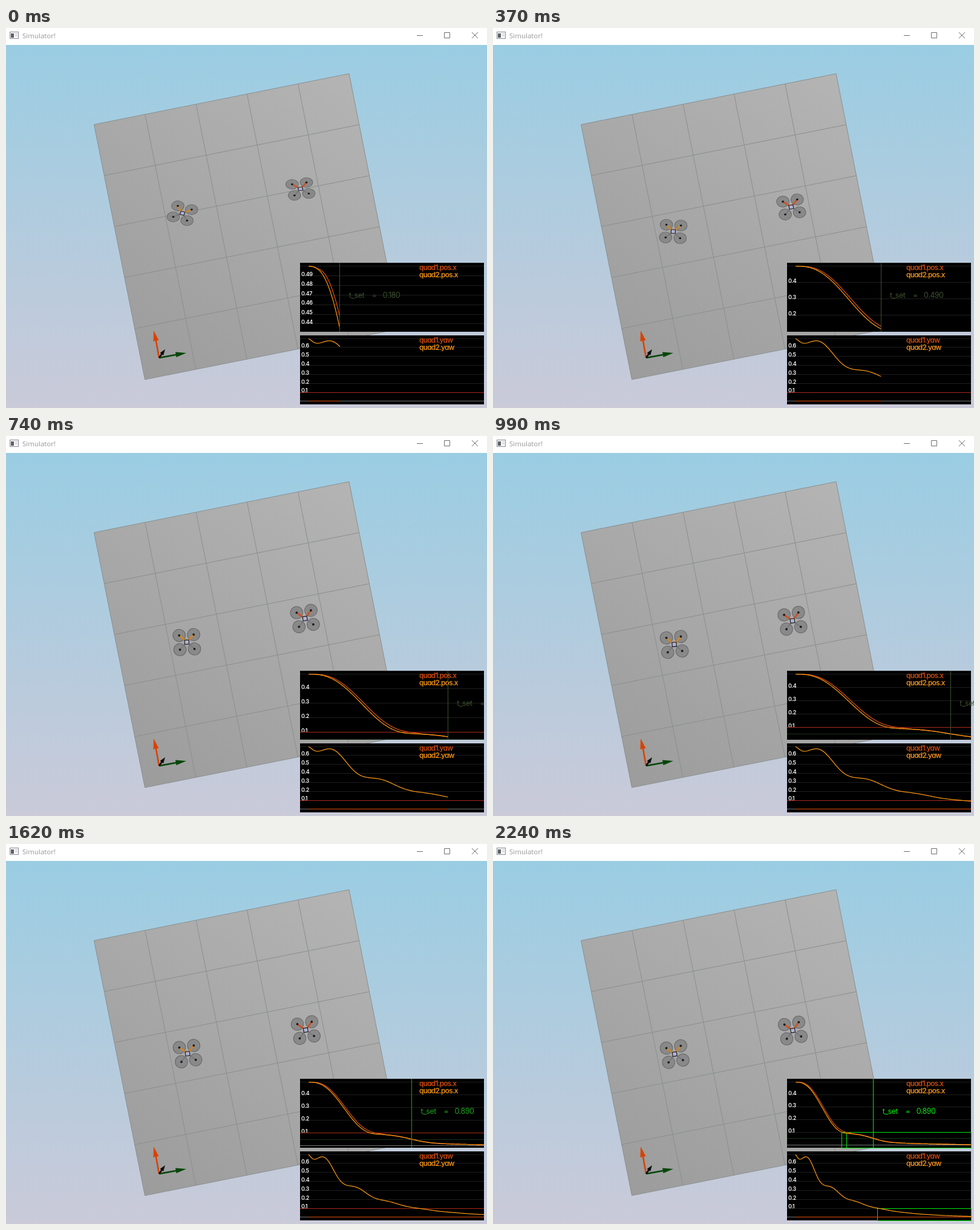
Write an HTML page that moves like this. It is 795x628 px and loops after 2.36 s.

```html
<!DOCTYPE html>
<html lang="en">
<head>
<meta charset="utf-8">
<title>Simulator</title>
<style>
html, body { margin: 0; width: 100%; height: 100%; overflow: hidden; background: #fff; }
svg { display: block; width: 795px; height: 628px; }
.title { font: 11.5px "Open Sans", "Noto Sans", sans-serif; fill: #999; }
.plot text { font-family: Inter, Roboto, sans-serif; font-feature-settings: "cv11"; }
.axis { font-size: 9px; font-weight: 600; letter-spacing: -.45px; }
.legend { font-size: 12px; font-weight: 500; letter-spacing: -.75px; }
.settle { font-size: 12.5px; letter-spacing: -.5px; }
.plot path, .plot line, .plot rect { fill: none; }
.plot line, .plot rect { shape-rendering: crispEdges; }
</style>
</head>
<body>
<svg viewBox="0 0 795 628">
  <defs>
    <linearGradient id="sky" x2="0" y2="1">
      <stop stop-color="#9acde3"/><stop offset="1" stop-color="#cacad9"/>
    </linearGradient>
    <linearGradient id="floor" gradientUnits="userSpaceOnUse" x1="567" y1="75" x2="229" y2="581">
      <stop stop-color="#b3b4b3"/><stop offset=".55" stop-color="#a6a7a6"/><stop offset="1" stop-color="#9c9c9c"/>
    </linearGradient>
    <clipPath id="top"><rect x="486" y="388" width="305" height="115"/></clipPath>
    <clipPath id="bottom"><rect x="486" y="508" width="305" height="115"/></clipPath>
  </defs>
  <rect width="795" height="628" fill="#fff"/>
  <rect y="28" width="795" height="600" fill="url(#sky)"/>
  <g fill="none" stroke="#707070">
    <rect x="6.5" y="6.5" width="14" height="11" fill="#f4f4f4" stroke="#8a8f96"/>
    <path d="M8 9h5v7h-5z" fill="#5d6066" stroke="none"/>
    <path d="M15 9.5h4M15 12.5h4" stroke="#c4c8cc"/>
    <path d="M679 12.5h10M724.5 7.5h9v9h-9zM770 7l10 10M780 7l-10 10"/>
  </g>
  <text class="title" x="27" y="17">Simulator!</text>
  <path d="M145.500 159.500L567 75.500L651 497L229.500 581z" fill="url(#floor)"/>
  <path id="grid" fill="none" stroke="#8b8f8f"/>
  <g id="drones"></g>
  <g stroke-width="2.600">
    <path d="M253 545L248 517" stroke="#d94304"/>
    <path d="M244 500L243.500 518L252.500 516z" fill="#d94304"/>
    <path d="M253 545L281 540" stroke="#06470a"/>
    <path d="M298 537L280 535.500L281.500 544z" fill="#06470a"/>
    <path d="M253 545L258 538" stroke="#080c14"/>
    <path d="M263 531L254.500 537L260 541z" fill="#080c14"/>
  </g>
  <path d="M486 388h304v114h-304zM486 508h304v114h-304z" fill="#000"/>
  <g id="plots" class="plot"></g>
</svg>
<script>
const LOOP = 2360, STEPS = 19, LEAD = 8;
const RED = "#e0500c", ORANGE = "#ff9a16", GREEN = "#00e60a", LIMIT = "#a82a18", ZERO = "#747474";
const LEFT = 500, RIGHT = 790, RATE = 288;
// Simulated seconds at which each signal settles, and how long it must hold.
const SETTLED = 0.89;
const WINDOW = { pos2: [0.532, 1.25], pos1: [0.586, 1.25], yaw2: [0.94, 1] };
const byId = id => document.getElementById(id);
const clamp = v => Math.min(1, Math.max(0, v));
const smoother = u => u * u * u * (10 + u * (6 * u - 15));

// A fast glide, then a slower second drop on a slight slope.
const pos2 = t => 0.398 * (1 - smoother(clamp(t / 0.61)))
  + 0.072 / (1 + Math.exp((t - 0.88) / 0.09)) + 0.03 * (1 - t / 2);
const pos1 = t => pos2(t) + 0.02 * Math.sin(Math.PI * clamp((t - 0.05) / 0.62));
// Exponential decay with a dying ripple.
const yaw2 = t => 0.7 * Math.exp(-2.07 * t)
  + 0.3 * Math.exp(-4.65 * t) * Math.sin(Math.PI * Math.max(0, t - 0.027) / 0.28) ** 2;

const quad2 = { home: [300.2, 347.2], pos: pos2, yaw: yaw2, arm: "#d8861a" };
const quad1 = { home: [495.5, 308.2], pos: pos1, yaw: () => 0, arm: "#d84a1a" };

function drone({ home, pos, yaw, arm }, t) {
  const x = pos(t), h = 0.02;
  const accel = (pos(t + h) - 2 * x + pos(t - h)) / (h * h);
  const squash = Math.cos(0.1 - 0.1 * accel);
  const turn = yaw(t) * 0.8 * 180 / Math.PI - 9.5;
  const tips = [[12, -12], [-12, -12], [12, 12], [-12, 12]];
  const rotors = tips.map(([u, v]) => `<circle cx="${u}" cy="${v}" r="10.3" fill="#898989" stroke="#666"/>`);
  const arms = tips.map(([u, v]) =>
    `<path d="M0 0L${u} ${v}" stroke="${v < 0 ? arm : "#74747f"}" stroke-width="${v < 0 ? 2.5 : 1.5}"/>`);
  const hubs = tips.map(([u, v]) => `<circle cx="${u}" cy="${v}" r="1.9" fill="#1c1c1c"/>`);
  return `<g transform="translate(${home[0] - 19.7 * x} ${home[1] - 94.5 * x}) scale(1 ${squash}) rotate(${turn})">
    ${[...rotors, ...arms, ...hubs].join("")}
    <rect x="-3.500" y="-3.500" width="7" height="7" fill="#b2b2d0" stroke="#202028" stroke-width="1.200"/></g>`;
}

const line = (x1, y1, x2, y2, color) =>
  `<line x1="${x1}" y1="${y1}" x2="${x2}" y2="${y2}" stroke="${color}"/>`;
const level = (y, color) => line(486, Math.floor(y) + 0.5, RIGHT, Math.floor(y) + 0.5, color);
const text = (x, y, s, color, cls) => `<text class="${cls}" x="${x}" y="${y}" fill="${color}">${s}</text>`;
const box = (x, top, bottom) => {
  const y = Math.floor(top) + 0.5;
  return `<rect x="${Math.floor(x) + 0.5}" y="${y}" width="${RIGHT - Math.floor(x)}" height="${bottom - y}" stroke="${GREEN}"/>`;
};
const passed = ([start, hold], t) => t > start + hold;

function trace(height, t, scale, color) {
  const points = [], end = t * scale;
  for (let d = 0; d < end; d++) points.push(`${LEFT + d} ${height(d / scale).toFixed(2)}`);
  points.push(`${LEFT + end} ${height(t).toFixed(2)}`);
  return `<path d="M${points.join("L")}" stroke="${color}" stroke-width="1.200"/>`;
}

function scaleMarks(y, min, max, step) {
  let out = "";
  for (let k = Math.ceil(min / step) || 1; k * step <= max + 1e-6; k++) {
    const v = k * step;
    out += level(y(v), "#1e1e1e");
    if (v < max - 1e-6) out += text(488, y(v) + 0.3, v.toFixed(step < 0.1 ? 2 : 1), "#f6f6f6", "axis");
  }
  return out;
}

const legend = (name, y) =>
  text(683, y, `quad1.${name}`, RED, "legend") + text(683, y + 11.7, `quad2.${name}`, ORANGE, "legend");

function settleMark(t, scale) {
  const shown = Math.min(t, SETTLED), x = LEFT + shown * scale;
  const glow = clamp((t - 1) / 0.7) ** 2;
  const mix = (dim, bright) => Math.round(dim + (bright - dim) * glow);
  const tint = `rgb(${mix(60, 0)},${mix(80, 235)},${mix(48, 10)})`;
  return line(x, 388, x, 502, tint) + text(x + 15, 445.5, "t_set", tint, "settle")
    + text(x + 53, 445.5, "=", tint, "settle") + text(x + 71, 445.5, shown.toFixed(2) + "0", tint, "settle");
}

function posPlot(t, scale) {
  const min = Math.max(0, pos2(t)), span = 0.5 - min;
  const y = v => 393.5 + (0.5 - v) / span * 103.5;
  const limit = y(0.1), edge = ([start]) => LEFT + start * scale;
  let out = scaleMarks(y, min, 0.5, span < 0.1 ? 0.01 : 0.1);
  if (y(0) < 502) out += level(y(0), ZERO);
  if (y(0.05) < 502) out += level(y(0.05), "#17331a");
  if (limit < 500 && !passed(WINDOW.pos1, t)) out += level(limit, LIMIT);
  for (const w of [WINDOW.pos2, WINDOW.pos1]) if (passed(w, t)) out += box(edge(w), limit, 502.5);
  out += legend("pos.x", 400) + trace(s => y(pos1(s)), t, scale, RED) + trace(s => y(pos2(s)), t, scale, ORANGE);
  return `<g clip-path="url(#top)">${out}</g>${settleMark(t, scale)}`;
}

function yawPlot(t, scale) {
  const y = v => 617 - v * 148.4;
  const out = scaleMarks(y, 0, 0.7, 0.1) + level(616.5, ZERO)
    + (passed(WINDOW.yaw2, t) ? box(LEFT + WINDOW.yaw2[0] * scale, 602, 622.5) : level(602, LIMIT))
    + legend("yaw", 520) + line(LEFT, 616.5, LEFT + t * scale, 616.5, RED)
    + trace(s => y(yaw2(s)), t, scale, ORANGE);
  return `<g clip-path="url(#bottom)">${out}</g>`;
}

function drawGrid() {
  let d = "";
  for (let i = 0; i <= 5; i++) {
    const u = i * 84.3, v = i * 16.8;
    d += `M${145.5 + u} ${159.5 - v}l84 421.500M${145.5 + v} ${159.5 + u}l421.500 -84`;
  }
  byId("grid").setAttribute("d", d);
}

function render(step) {
  const t = 0.18 + 0.1033 * step - 0.0048 * Math.max(0, step - 11);
  const scale = Math.min(RATE, (RIGHT - LEFT) / t);
  byId("drones").innerHTML = drone(quad2, t) + drone(quad1, t);
  byId("plots").innerHTML = posPlot(t, scale) + yawPlot(t, scale);
}

let shown = -1;
const begin = performance.now();
function tick() {
  const now = (performance.now() - begin) % LOOP;
  const step = Math.min(STEPS - 1, Math.floor((now + LEAD) * STEPS / LOOP));
  if (step !== shown) render(shown = step);
  requestAnimationFrame(tick);
}
drawGrid();
tick();
</script>
</body>
</html>
```
